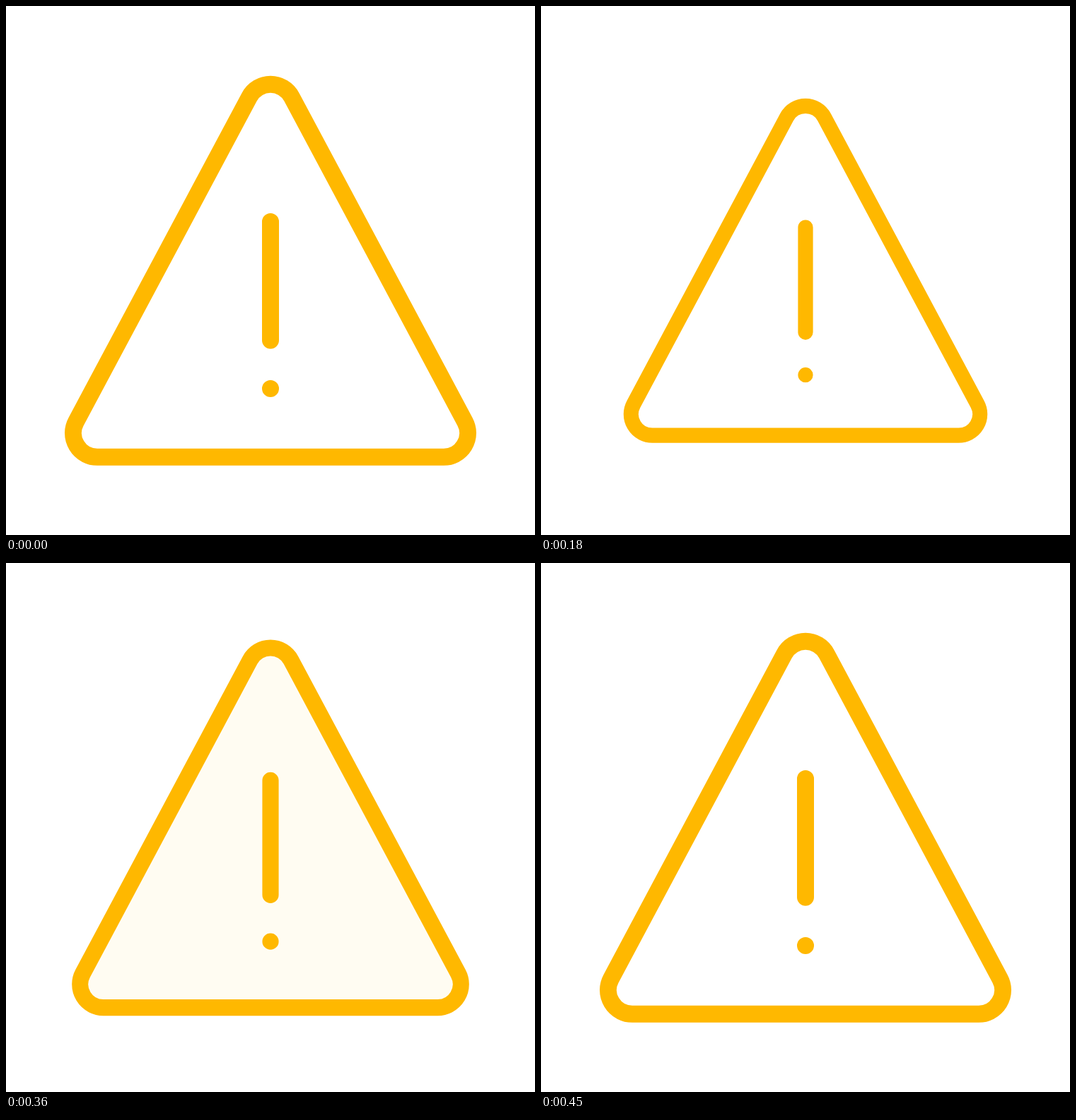
Animation of 748x748 px, one loop 1110 ms. Source, as an HTML page:

```html
<!DOCTYPE html>
<html lang="en">
<head>
<meta charset="utf-8">
<title>Warning</title>
<style>
html, body { margin: 0; width: 100%; height: 100%; overflow: hidden; background: #fff; }
svg { display: block; width: 100vw; height: 100vh; }
</style>
</head>
<body>
<svg viewBox="0 0 748 748">
  <g id="sign" fill="none" stroke="#ffb800" stroke-width="24" stroke-linecap="round">
    <path id="tri" fill="#ffb800" fill-opacity="0"
      d="M129 637.8A34 34 0 0 1 99 587.8L344 128.8A34 34 0 0 1 404 128.8L649 587.8A34 34 0 0 1 619 637.8Z"/>
    <path d="M374 305V472.8M374 541h.01"/>
  </g>
</svg>
<script>
const LOOP = 1110, STEP = 30, MID = 374;
const sign = document.getElementById('sign');
const tri = document.getElementById('tri');

// Scale at each step; the sign rests at 1 afterwards.
const scales = [
  1, .949, .9135, .893, .884, .882, .884, .89,
  .902, .926, .9615, .995, .965, .952, .97, 1
];
// Tint pulse that goes with the second, smaller dip.
const TINT_MID = 390, TINT_HALF = 60, TINT = .1;

function draw(now) {
  const n = Math.floor((now % LOOP) / STEP);
  const s = scales[Math.min(n, scales.length - 1)];
  const tint = Math.max(0, 1 - Math.abs(n * STEP - TINT_MID) / TINT_HALF);
  sign.setAttribute('transform',
    `translate(${MID} ${MID}) scale(${s}) translate(${-MID} ${-MID})`);
  tri.setAttribute('fill-opacity', TINT * tint);
}

const start = performance.now();
function tick() {
  draw(performance.now() - start);
  requestAnimationFrame(tick);
}
tick();
</script>
</body>
</html>
```
